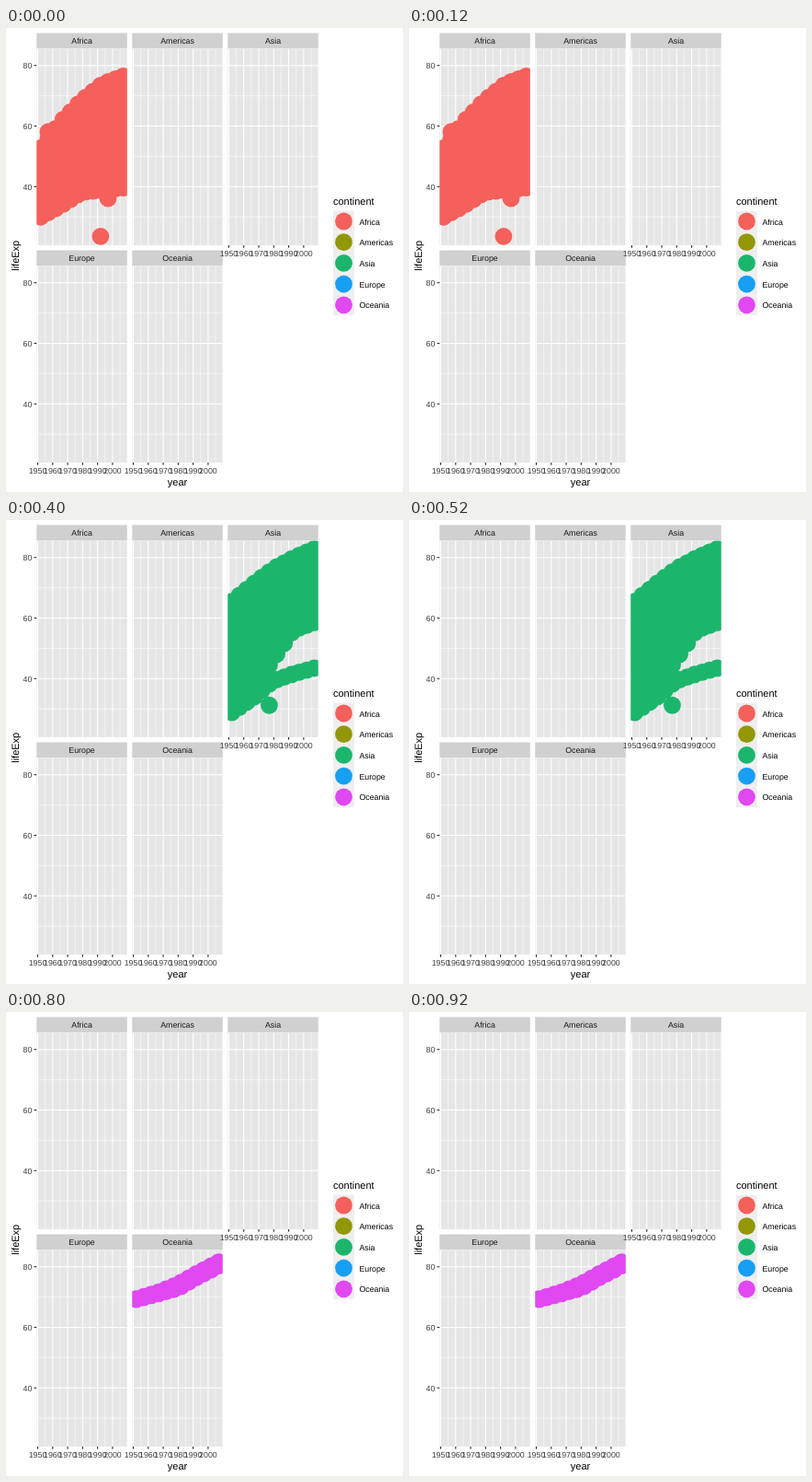
An HTML page that plays this animation: 432x504 px, repeating every 1000 ms.

```html
<!DOCTYPE html>
<html lang="en">
<head>
<meta charset="utf-8">
<title>Life expectancy by continent</title>
<style>
  html, body { margin: 0; width: 100%; height: 100%; overflow: hidden; background: #fff; }
  svg { display: block; }
  text { font: 8.8px "Liberation Sans", Arial, sans-serif; text-rendering: geometricPrecision; }
  .title { font-size: 11px; }
  .mid { text-anchor: middle; }
  .end { text-anchor: end; }
  .axis { fill: #404040; }
  .strip { fill: #161616; }
  .tick { stroke: #262626; stroke-width: 1.07; }
  .major { stroke: #fff; stroke-width: 1.07; }
  .minor { stroke: #fff; stroke-width: .53; }
  .dots { stroke-width: 18.8; stroke-linecap: round; fill: none; }
</style>
</head>
<body>
<svg id="chart" width="432" height="504"></svg>
<script>
// A band is [lower edge, upper edge] or a single line; each edge is a few
// key values spread evenly over the years. Dots are outliers [year, value].
const continents = [
  { name: 'Africa', color: '#f5605b',
    bands: [[[30, 33.8, 38.2, 38.8, 39.6], [52.7, 61.5, 68.5, 73.9, 76.4]]],
    dots: [[1957, 58.1], [1992, 23.6], [1997, 36.1]] },
  { name: 'Americas', color: '#929705',
    bands: [[[37.6, 44.8, 50.6, 55.4, 60.3], [68.7, 71.9, 75, 78.1, 80.7]]] },
  { name: 'Asia', color: '#1bb66c',
    bands: [[[32.5, 36, 46.3, 56, 58.5], [65.4, 71, 76.2, 79.9, 82.8]],
            [[28.8, 33.5, 39.2, 41.6, 43.5]]],
    dots: [[1977, 31.2]] },
  { name: 'Europe', color: '#169ff3',
    bands: [[[54.1, 64.4, 69.2, 69.4, 72.2], [72.7, 74, 76.3, 78.7, 81.8]],
            [[43.8, 54.1, 60.2, 66.3, 72.1]]] },
  { name: 'Oceania', color: '#e048f1',
    bands: [[[69.2, 71, 72.8, 76.7, 80.3], [69.4, 71.4, 74.1, 78, 81.5]]] }
];

const FIRST = 1952, LAST = 2007;
const W = 98.5, H = 213.6, STRIP = 16.9, STEP = 200;
const panelX = col => 33.3 + col * 103.98;
const panelY = row => 22.4 + row * 236;
const px = year => (year - 1949.25) * W / 60.5;
const py = value => H - (value - 20.649) * H / 64.904;

const line = (x1, y1, x2, y2, cls) =>
  `<line x1="${x1}" y1="${y1}" x2="${x2}" y2="${y2}" class="${cls}"/>`;
const rect = (x, y, w, h, fill) =>
  `<rect x="${x}" y="${y}" width="${w}" height="${h}" fill="${fill}"/>`;
const text = (x, y, str, cls = '') => `<text x="${x}" y="${y}" class="${cls}">${str}</text>`;
const range = (from, to, step) =>
  Array.from({ length: Math.floor((to - from) / step) + 1 }, (_, i) => from + i * step);

const decades = range(1950, 2000, 10);
const levels = range(40, 80, 20);

function valueAt(keys, year) {
  const t = (year - FIRST) / (LAST - FIRST) * (keys.length - 1);
  const i = Math.min(Math.floor(t), keys.length - 2);
  return keys[i] + (keys[i + 1] - keys[i]) * (t - i);
}

function grid() {
  const vertical = cls => year => line(px(year), 0, px(year), H, cls);
  const horizontal = cls => value => line(0, py(value), W, py(value), cls);
  return [
    ...range(30, 70, 20).map(horizontal('minor')),
    ...range(1955, 2005, 10).map(vertical('minor')),
    ...levels.map(horizontal('major')),
    ...decades.map(vertical('major'))
  ].join('');
}

// Overlapping dots of one year merge into a round-ended vertical stroke.
const capsule = (year, low, high = low) => `M${px(year)} ${py(low)}V${py(high) - .01}`;

function points({ color, bands, dots = [] }) {
  const path = dots.map(([year, value]) => capsule(year, value));
  for (const [low, high = low] of bands)
    for (const year of range(FIRST, LAST, 5))
      path.push(capsule(year, valueAt(low, year), valueAt(high, year)));
  return `<path class="dots" stroke="${color}" d="${path.join('')}"/>`;
}

function panel(c, i) {
  const x = panelX(i % 3), y = panelY(Math.floor(i / 3));
  return rect(x, y - STRIP, W, STRIP, '#d0d0d0') +
    text(x + W / 2, y - 5, c.name, 'strip mid') +
    `<svg x="${x}" y="${y}" width="${W}" height="${H}">` +
    rect(0, 0, W, H, '#e6e6e6') + grid() + points(c) + '</svg>';
}

function xAxis(col, row) {
  const y = panelY(row) + H;
  return decades.map(year => {
    const x = panelX(col) + px(year);
    return line(x, y, x, y + 2.74, 'tick') + text(x, y + 12.2, year, 'axis mid');
  }).join('');
}

function yAxis(row) {
  const x = panelX(0);
  return levels.map(value => {
    const y = panelY(row) + py(value);
    return line(x - 2.74, y, x, y, 'tick') + text(x - 4.9, y + 3.2, value, 'axis end');
  }).join('');
}

function legend() {
  return text(356, 192.2, 'continent', 'title') + continents.map((c, i) => {
    const y = 210 + i * 22.7;
    return rect(356.1, y - 11.35, 22.8, 22.7, '#eee') +
      `<circle cx="367.5" cy="${y}" r="9.4" fill="${c.color}"/>` +
      text(384.4, y + 3.5, c.name);
  }).join('');
}

const chart = document.getElementById('chart');
chart.innerHTML = continents.map(panel).join('') +
  xAxis(2, 0) + xAxis(0, 1) + xAxis(1, 1) + yAxis(0) + yAxis(1) +
  text(186.5, 497, 'year', 'title mid') +
  '<text class="title mid" transform="translate(13.5 247.3) rotate(-90)">lifeExp</text>' +
  legend();

const layers = chart.querySelectorAll('.dots');
function draw() {
  const current = Math.floor(performance.now() / STEP) % layers.length;
  layers.forEach((el, i) => el.style.visibility = i === current ? 'visible' : 'hidden');
  requestAnimationFrame(draw);
}
draw();
</script>
</body>
</html>
```
